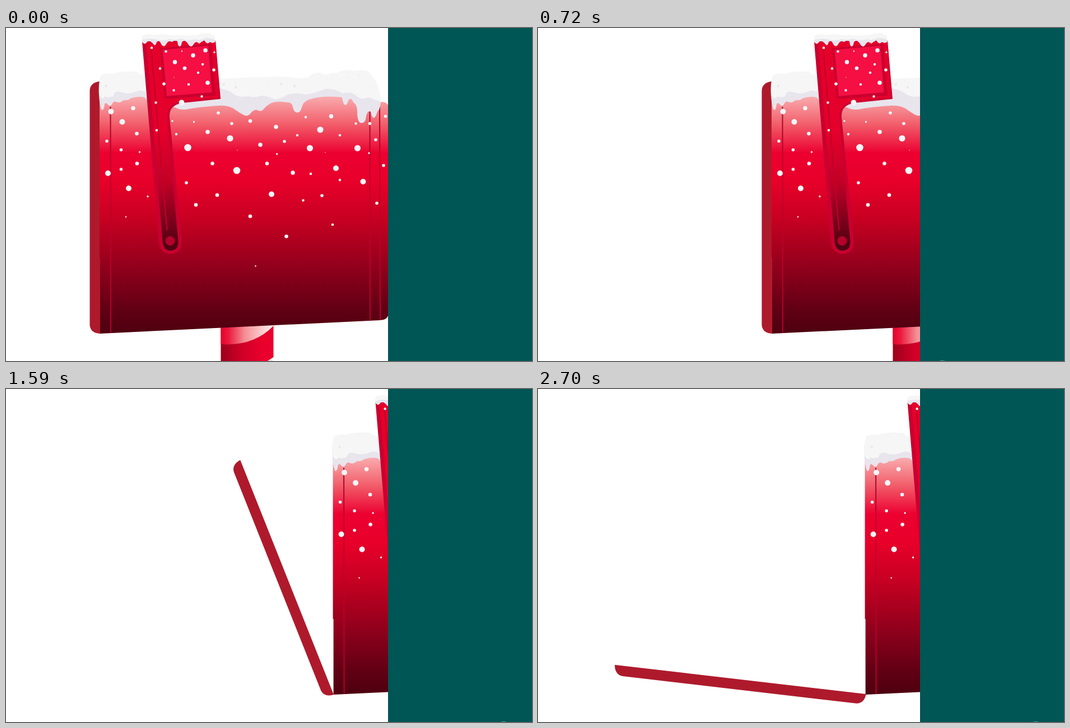
Animation of 939x596 px, one loop 2.73 s. Source, as an HTML page:

```html
<!DOCTYPE html>
<html lang="en">
<head>
<meta charset="utf-8">
<title>Snowy mailbox</title>
<style>
html, body { margin: 0; width: 100%; height: 100%; overflow: hidden; background: #fff; }
svg { display: block; }
.dots path { stroke: #f8f5f7; stroke-linecap: round; fill: none; }
</style>
</head>
<body>
<svg width="939" height="596" viewBox="0 0 939 596">
  <defs>
    <linearGradient id="body" gradientUnits="userSpaceOnUse" x1="0" y1="120" x2="0" y2="545">
      <stop offset="0" stop-color="#f9b0b2"/>
      <stop offset=".12" stop-color="#f2606c"/>
      <stop offset=".245" stop-color="#ec0030"/>
      <stop offset=".36" stop-color="#e8002a"/>
      <stop offset=".52" stop-color="#c80022"/>
      <stop offset=".75" stop-color="#8a001b"/>
      <stop offset=".9" stop-color="#620014"/>
      <stop offset="1" stop-color="#4e0010"/>
    </linearGradient>
    <linearGradient id="seam" gradientUnits="userSpaceOnUse" x1="0" y1="140" x2="0" y2="545">
      <stop offset="0" stop-color="#a8082c"/>
      <stop offset=".4" stop-color="#bf0029"/>
      <stop offset="1" stop-color="#b0002d"/>
    </linearGradient>
    <linearGradient id="arm" gradientUnits="userSpaceOnUse" x1="270" y1="190" x2="295" y2="385">
      <stop offset="0" stop-color="#e4002b"/>
      <stop offset=".45" stop-color="#c20026"/>
      <stop offset=".8" stop-color="#7c001b"/>
      <stop offset="1" stop-color="#520012"/>
    </linearGradient>
    <linearGradient id="post">
      <stop offset="0" stop-color="#9c001c"/>
      <stop offset=".4" stop-color="#cf0027"/>
      <stop offset=".8" stop-color="#ea002c"/>
    </linearGradient>
    <linearGradient id="stripe">
      <stop offset="0" stop-color="#e6002b"/>
      <stop offset=".15" stop-color="#ec1a3e"/>
      <stop offset=".45" stop-color="#f48d94"/>
      <stop offset="1" stop-color="#fff5f4"/>
    </linearGradient>
  </defs>

  <g id="box">
    <path fill="url(#post)" d="M383.500 530H477.500V589Q472 593 465 597H383.500Z"/>
    <path fill="url(#stripe)" d="M383.500 530H477.500V533Q442 570 383.500 566Z"/>

    <path id="door" fill="#ae1a2c" d="M168 95.500C158 96 149.500 102 149.500 112V532Q151 546 168 547Z"/>

    <path fill="url(#body)" d="M167 112H660L669 132Q680 132 682.500 139V512Q682 522 668 523L168 547V412L167 411Z"/>
    <path stroke="url(#seam)" stroke-width="2" d="M186.500 141L187 545.500M649.500 150L650 524M667 139L668 523"/>

    <path fill="#e8e5ed" d="M166 100Q165 122 168 137Q170 147 172 147Q175 146 176 137Q177 132 181 136Q186 143 190 135
      Q193 129 199 133Q205 134 210 129Q218 130 222 126Q235 121 247 124L258 136L296 139Q308 147 320 146
      Q345 141 378 139Q396 138 406 144Q424 157 429 157Q434 157 438 151Q444 145 449 147Q456 151 460 145
      Q466 138 474 134Q486 130 500 133Q511 132 512 142Q514 151 520 151.500Q526 151 528 142Q530 132 541 128
      Q565 120 600 124Q602 138 606 138Q609 137 611 130Q616 122 620 133Q627 137 627 150Q627 169 634 170
      Q642 171 643 157Q646 147 651 149Q653 161 657 161Q661 158 663 149Q669 147 669 125L655 95H170Z"/>
    <path fill="#f6f6f6" d="M166 119Q165 92 170 84Q178 80 190 82Q205 77 230 78Q237 78 239 83Q247 82 250 92L379 91
      Q405 90 440 88L500 87Q510 89 520 90Q532 90 541 87Q549 79 560 80Q572 86 584 80Q592 82 599 76Q612 74 621 77Q635 74 645 77
      Q653 82 657 90Q667 104 670 134Q663 128 657 129Q650 122 641 126Q632 128 624 120Q614 113 600 117Q588 108 570 109
      Q550 117 535 119Q518 115 503 119Q490 127 479 128Q467 121 455 121Q443 126 432 122Q417 125 408 119Q397 110 381 108L252 121
      Q250 111 237 112Q217 121 203 114Q194 112 191 122Q182 126 177 122Q173 131 166 119Z"/>
    <path fill="none" stroke="#e9e8ec" stroke-width="4.500" stroke-linecap="round"
      d="M179 104h0M389 101h0M410 106h0M491 100h0M515 104h0"/>
    <path fill="none" stroke="#ececee" stroke-width="2.500" stroke-linecap="round"
      d="M466 103h0M572 91h0M612 87h0M630 85h0"/>

    <path fill="#c9002f" d="M243 24L374 22L383 127L316 134Q290 138 292 160L313.500 380Q314 404 294 404Q275 404 273 382Z"/>
    <path fill="#e5002b" d="M250 25H262L276 190H264ZM262 25L373 23L380 124L312 131Q286 137 288 160L291 195H276Z"/>
    <path fill="url(#arm)" d="M263.500 185H290L307.500 382Q308 398 294 398.500Q281 399 279.500 382Z"/>
    <path fill="none" stroke="#bb0029" stroke-width="2" d="M259 34L277 245"/>
    <path fill="none" stroke="#c0002e" stroke-width="2" d="M277 245L287.500 362"/>
    <path fill="#c9002f" d="M275 36L366 28L374 121L283 127Z"/>
    <path fill="#f50f43" d="M279.500 39L361 32L367.500 115L287 122Z"/>
    <circle cx="293" cy="381" r="8.500" fill="#b5002b"/>

    <path fill="#e8e5ed" d="M243 17V25Q247 31 251 26Q255 20 259 25Q262 27 264 30Q267 33 269 25Q274 20 277 29
      Q282 36 286 29Q290 21 296 25Q302 21 306 24Q307 33 310 33Q313 33 314 25Q319 20 324 27Q330 38 335 29
      Q339 22 345 28Q350 24 354 22Q359 31 364 25Q370 29 374 24L372 15Z"/>
    <path fill="#f6f6f6" d="M243 21Q241 13 248 12Q257 10 265 13Q280 9 293 13Q310 11 325 14Q337 13 347 11Q351 7 357 10
      Q363 7 368 12Q375 13 373 21Q364 17 356 18Q346 23 338 20Q325 24 313 19Q302 22 291 20Q279 24 267 20Q255 18 243 21Z"/>

    <g class="dots">
      <path stroke-width="12.600" d="M324.500 214h0M412 255h0"/>
      <path stroke-width="11.200" d="M400 197.500h0M561 182h0M542.500 215h0M627.500 215h0"/>
      <path stroke-width="10" d="M187.500 149.500h0M207.500 168h0M182 260h0M219 287h0M474 297.500h0M589 251h0M637.500 275h0M313.500 133.500h0"/>
      <path stroke-width="7.500" d="M227 143.500h0M360 186h0M580.500 158h0M482 177h0M454 209h0M512 259h0M334 49h0M356 40h0M301.500 61h0M360 98h0"/>
      <path stroke-width="6.600" d="M233.500 189h0M234 242.500h0M368.500 242.500h0M466 242.500h0M339 316.500h0M377 299h0M436 337h0M500.500 373h0M436 166.500h0M319 72h0"/>
      <path stroke-width="5.600" d="M180 202.500h0M205.500 218h0M205.500 253h0M379 152h0M403 171h0M497 203h0M322 277h0M564 300h0
        M662 313.500h0M674 246h0M660 200h0M649.500 171h0M677.500 158h0M282 100h0M371 75h0"/>
      <path stroke-width="4.500" d="M520 192h0M596 192h0M535 159.500h0M304 190h0M530.500 308.500h0M583 352h0M544 261h0M596 272h0M624.500 171h0
        M260 35.500h0M275 72.500h0M285.500 42h0M351 65h0M343 80h0M326 101h0M299.500 111.500h0M349.500 122.500h0M267.500 133.500h0M269 183h0"/>
      <path stroke-width="3.400" d="M238.500 222h0M253 301.500h0M297 166.500h0M335.500 168h0M483.500 225.500h0M648 224h0M372 43.500h0"/>
      <path stroke-width="2.600" d="M214 338h0M445.500 426h0M314 41.500h0"/>
      <path stroke-width="1.500" d="M413 219h0M570 223h0M300 88.500h0"/>
    </g>
  </g>

  <path fill="#005654" d="M682 0H939V596H682Z"/>
  <path id="sliver" fill="#8fb3b1" d="M466 596Q472 594.500 477.500 596Z"/>
</svg>
<script>
const STEP = 30, LOOP = 2730, SLIDE_STEPS = 40;
const [box, door, sliver] = ["box", "door", "sliver"].map(id => document.getElementById(id));

function draw(now) {
  const step = Math.floor((now % LOOP) / STEP);
  // Slide behind the green panel, then swing the door open.
  const x = Math.min(step, SLIDE_STEPS) * 416.6 / SLIDE_STEPS;
  const angle = Math.max(step - SLIDE_STEPS, 0) * 5 / 3;
  box.setAttribute("transform", `translate(${x})`);
  sliver.setAttribute("transform", `translate(${x})`);
  door.setAttribute("transform", `rotate(${-angle} 168 546)`);
  requestAnimationFrame(draw);
}
draw(performance.now());
</script>
</body>
</html>
```
